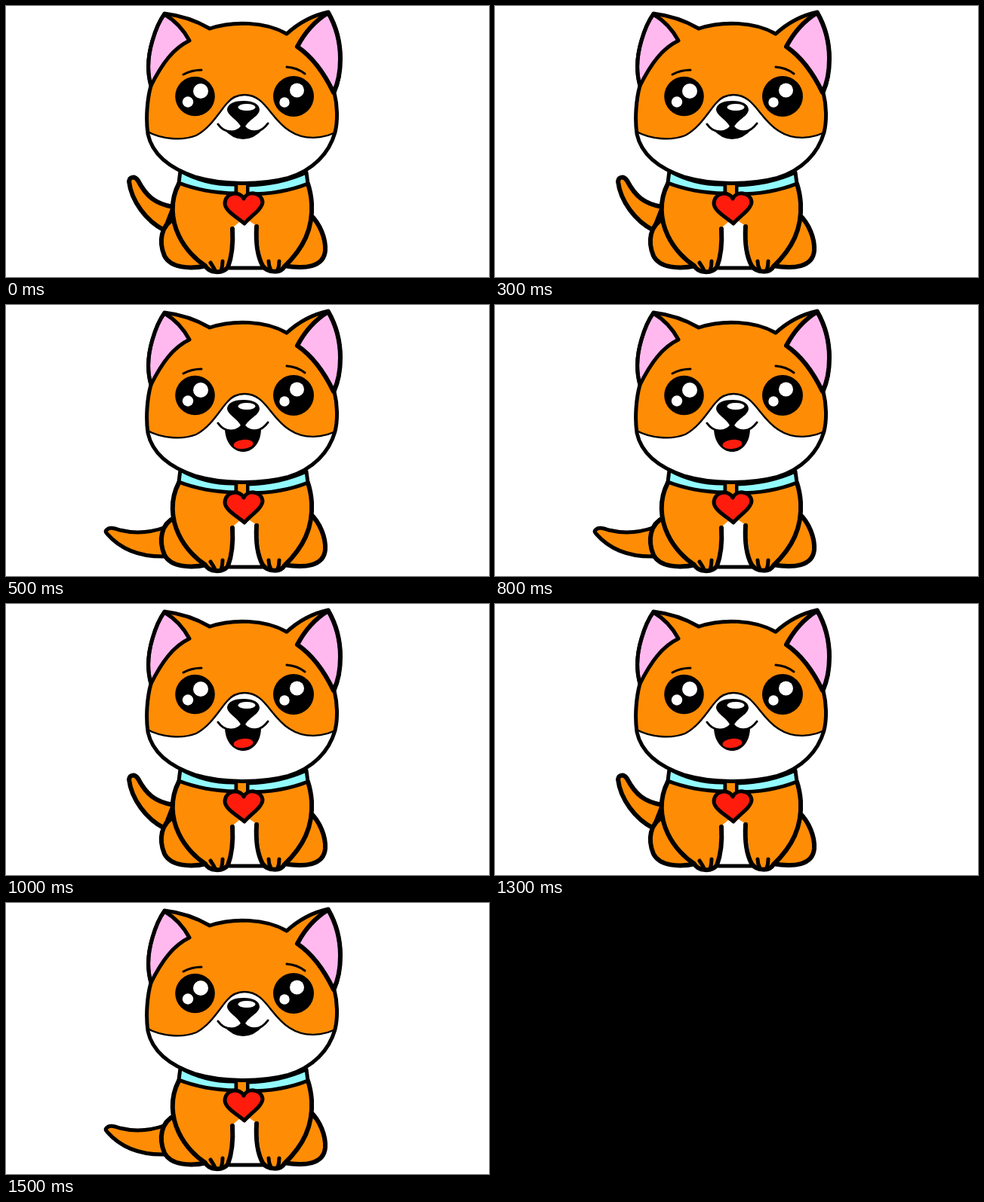
An HTML page for the animation above (2000 ms loop, 640x360 px).

```html
<!DOCTYPE html>
<html lang="en">
<head>
<meta charset="utf-8">
<title>Puppy</title>
<style>
  html, body { margin: 0; width: 100%; height: 100%; overflow: hidden; background: #fff; }
  svg { display: block; width: 100vw; height: 100vh; }
  .ink { stroke: #000; stroke-width: 6; stroke-linecap: round; stroke-linejoin: round; }
  .mid { stroke-width: 5; }
  .thin { stroke-width: 2.4; }
  .line { stroke-width: 3; }
  .fur { fill: #ff8c05; }
  .pink { fill: #ffb9ef; }
  .blue { fill: #92fafd; }
  .red { fill: #ff1c0c; }
  .white { fill: #fff; }
  .none { fill: none; }
</style>
</head>
<body>
<svg viewBox="0 0 640 360" xmlns="http://www.w3.org/2000/svg">
  <defs>
    <path id="skull" d="M270 30 C300 19.500 344 20.500 372 37 C386 24 404 13 427 8 C438 28 443 48 443 70 C443 88 440 103 435 115
      C439 131 440 152 436 168 C428 196 407 218 374 228.500 C338 238 287 238 252 227.500 C219 216.500 194 198 188 170
      C185 150 187 124 192 106 C187 88 188 66 194 46 C198 32 203 20 210 10 C235 13 253 20 270 30 Z"/>
    <clipPath id="face"><use href="#skull"/></clipPath>
  </defs>

  <!-- tail poses -->
  <path id="tailUp" class="ink fur" d="M163 233 C164 226 171 226 175 232 C186 253 198 263 222 267 L210 298 C186 286 166 259 163 233 Z"/>
  <path id="tailDown" class="ink mid fur" d="M133 299 C138 294 144 297 151 299 C171 304 190 303 212 295 L212 334 C181 335 154 327 134 304 Q131 301 133 299 Z"/>

  <!-- hips -->
  <path class="ink fur" d="M224 282 C205 291 202 313 210 332 C218 348 244 350 266 345 Z"/>
  <path class="ink fur" d="M403 277 C416 289 424 309 423 325 C421 347 396 350 368 345 Z"/>

  <!-- body and legs -->
  <path class="fur" d="M229 236 C217 259 219 284 229 305 C238 324 253 338 264 345 C269 355 287 356 294 348 L341 347 C347 355 364 356 369 346 C394 322 407 296 405 262 Q404 248 400 236 Z"/>
  <path class="white" d="M302 293 L309 287 L315 291 L323 286 L332 292 L340 348 L296 348 Z"/>
  <g class="ink none">
    <path d="M229 236 C217 259 219 284 229 305 C238 324 253 338 264 345 C269 355 287 356 294 347 C300 331 301 313 300 296"/>
    <path d="M400 236 Q404 248 405 262 C407 296 394 322 369 346 C364 355 347 355 340 345 C332 330 331 311 332 293"/>
    <path class="mid" d="M296 348 H340 M271 341 Q275 347 278 353 M287 339 Q287 346 285 352 M348 339 Q348 345 351 351 M362 339 Q362 346 360 351"/>
  </g>

  <!-- collar -->
  <path class="ink mid blue" d="M231 219 Q265 238 305 237 V249 Q262 248 229 235 Z"/>
  <path class="ink mid blue" d="M320 238 Q363 237 398 221 L400 236 Q365 250 320 250 Z"/>
  <path class="fur" d="M307.5 236 H318 V254 H307.5 Z"/>

  <!-- head -->
  <use href="#skull" class="fur"/>
  <path class="ink thin white" clip-path="url(#face)" d="M184 165 C206 178 234 179 252 172 C272 161 283 140 293 129 Q302 118 316 118 C344 118 350 150 376 166 C394 178 420 178 442 165 V245 H184 Z"/>
  <path class="ink mid pink" d="M210 11 C225 20 235 31 243 46 C222 56 207 76 192 106 C187 88 188 66 194 46 C198 32 203 20 210 11 Z"/>
  <path class="ink pink" d="M427 9 C409 20 396 35 386 54 C408 69 422 90 434 115 C440 103 443 88 443 70 C443 48 438 28 427 9 Z"/>
  <use href="#skull" class="ink mid none"/>

  <!-- face -->
  <path class="ink line none" d="M235 91 Q246 85 259 85 M372 81 Q386 82 396 90"/>
  <circle cx="250.5" cy="120" r="26.3"/>
  <circle cx="381" cy="120" r="27"/>
  <g class="white">
    <circle cx="258" cy="113" r="10"/>
    <circle cx="241" cy="127.5" r="7.2"/>
    <circle cx="385.5" cy="112" r="9.5"/>
    <circle cx="369" cy="128" r="6.7"/>
  </g>
  <path id="closed" d="M288 163 Q304 170 314 161 Q324 170 341 163 Q329 177 314 177 Q300 177 288 163 Z"/>
  <g id="open">
    <path d="M290 165 Q305 169 314 160 Q323 169 338 165 C337 205 292 205 290 165 Z"/>
    <ellipse class="red" cx="314.5" cy="185" rx="13" ry="6" transform="rotate(-6 314.5 185)"/>
  </g>
  <path class="ink line none" d="M281 157 C289 169 306 171 314 158 C322 171 338 169 347 156"/>
  <path d="M293 137 C294 129 304 126 315 126 C327 126 336 130 336 138 C335 147 322 150 316 162 H312 C307 150 293 146 293 137 Z"/>
  <ellipse class="white" cx="319" cy="134.5" rx="11.5" ry="4.5"/>

  <!-- heart tag -->
  <path class="ink mid red" d="M315 256 C310 245 291 247 290 262 C290 272 305 280 316 289 C323 280 340 270 340 260 C338 247 320 245 315 256 Z"/>
</svg>
<script>
  const loop = 2000;
  // visibility per half second
  const poses = {
    tailUp:   [1, 0, 1, 0],
    tailDown: [0, 1, 0, 1],
    closed:   [1, 0, 0, 1],
    open:     [0, 1, 1, 0]
  };

  for (const [id, steps] of Object.entries(poses)) {
    const keys = [...steps, steps[0]].map((opacity, i) => ({
      opacity, offset: i / steps.length, easing: 'step-end'
    }));
    const anim = document.getElementById(id).animate(keys, { duration: loop, iterations: Infinity });
    anim.startTime = 0;
  }
</script>
</body>
</html>
```
